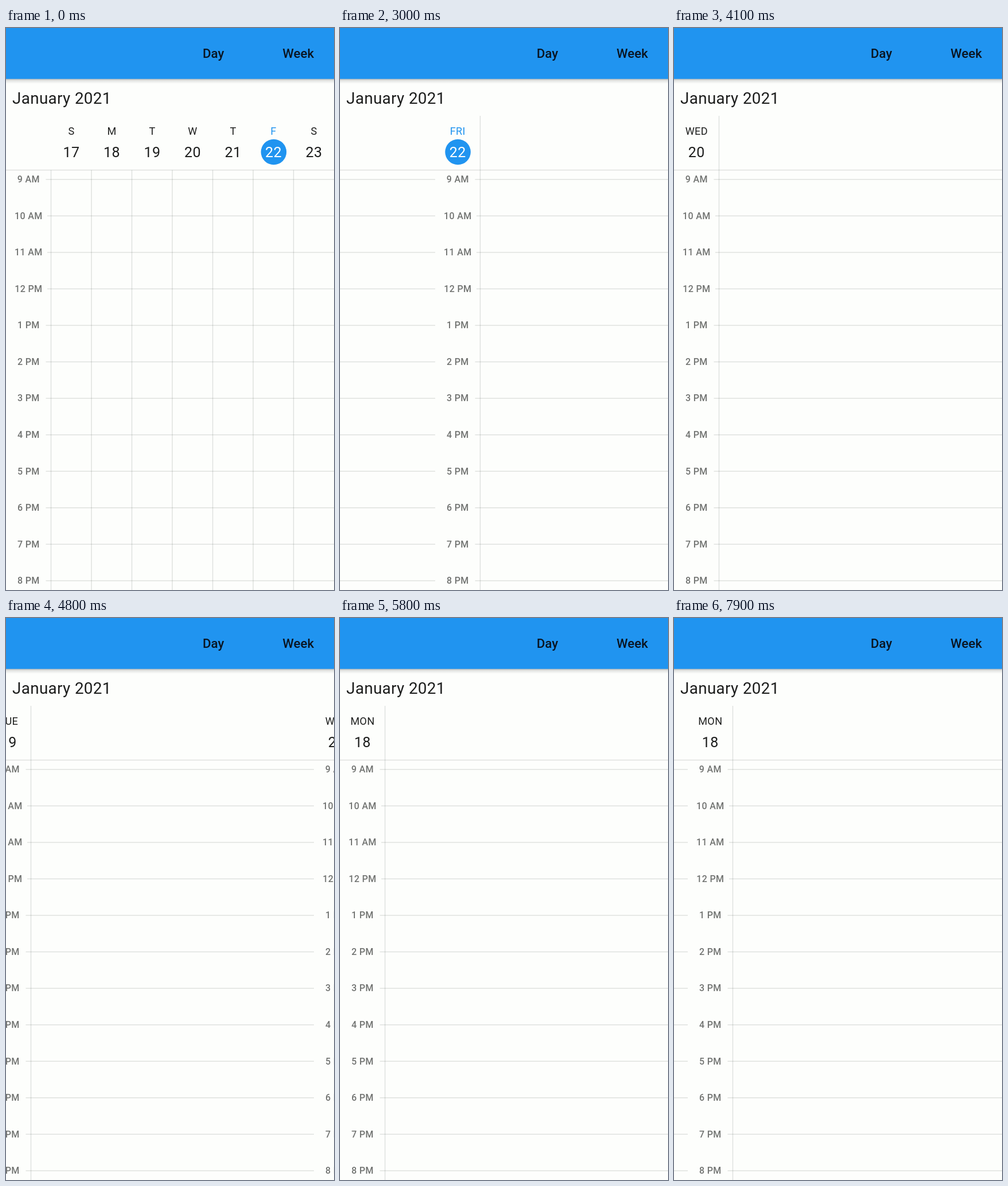
An HTML page with a canvas that plays this animation: 572 by 979 pixels, repeating every 8 s.

```html
<!DOCTYPE html>
<html lang="en">
<head>
<meta charset="utf-8">
<title>Calendar day and week views</title>
<style>
  html, body { margin: 0; width: 100%; height: 100%; overflow: hidden; background: #fdfefc; }
  canvas { display: block; }
</style>
</head>
<body>
<canvas id="stage" width="572" height="979"></canvas>
<script>
const W = 572, H = 979, LOOP = 8000, TICK = 100;
const BLUE = '#2094f0', PAPER = '#fdfefc', INK = '#1d1e1d', GREY = '#717371';
const LINE = 'rgba(0,20,10,0.125)';
const GUTTER = 78.5, HEAD_TOP = 153, HEAD_END = 247.5;
const ROW0 = 263.8, ROW_H = 63.55;
const TODAY = 22, NAMES = ['SUN', 'MON', 'TUE', 'WED', 'THU', 'FRI', 'SAT'];
const FADE_START = 12, FADE_STEPS = 5;

// Page swipes: first tick, day left, direction, distance travelled per tick
const SWIPES = [
  [30, 22, -1, [166, 540, 569, W]],
  [38, 21, -1, [133, 538, 569, W]],
  [46, 20, -1, [34, 160, 537, 569, W]],
  [55, 19, -1, [150, 540, 569, W]],
  [63, 18, -1, [320, 556, W]],
  [78, 17, 1, [138, 548]]
];

const ctx = document.getElementById('stage').getContext('2d');

function text(str, x, y, size, color, weight = 400, align = 'center', gap = 0.35) {
  ctx.font = `${weight} ${size}px Roboto, sans-serif`;
  ctx.letterSpacing = gap + 'px';
  ctx.textAlign = align;
  ctx.fillStyle = color;
  ctx.fillText(str, x, y);
}

function hLine(x0, x1, y) {
  ctx.fillStyle = LINE;
  ctx.fillRect(x0, y - 0.7, x1 - x0, 1.4);
}

function vLine(x, top) {
  ctx.fillStyle = LINE;
  ctx.fillRect(x - 0.7, top, 1.4, H - top);
}

function dayLabel(name, day, x) {
  const today = day === TODAY;
  if (today) {
    ctx.fillStyle = BLUE;
    ctx.beginPath();
    ctx.arc(x + 0.3, 216, 22.3, 0, Math.PI * 2);
    ctx.fill();
  }
  text(name, x, 186.3, 18.1, today ? BLUE : INK);
  text(day, x, 224.8, 25.06, today ? '#fff' : INK);
}

function hours(x) {
  for (let i = 0; i < 12; i++) {
    const y = ROW0 + i * ROW_H;
    const hour = (i + 8) % 12 + 1;
    text(`${hour} ${i < 3 ? 'AM' : 'PM'}`, x + 39.3, y + 5.3, 16, GREY, 500);
    hLine(x + (hour > 9 ? 72 : 69.5), x + W, y);
  }
}

function weekView() {
  const colW = (W - GUTTER) / 7;
  hLine(0, W, HEAD_END);
  hours(0);
  NAMES.forEach((name, i) => {
    const x = GUTTER + i * colW;
    vLine(x, HEAD_END);
    dayLabel(name[0], 17 + i, x + colW / 2 + 0.3);
  });
}

function dayView(pos) {
  hLine(0, W, HEAD_END);
  for (let day = Math.floor(pos); day <= Math.ceil(pos); day++) {
    const x = (day - pos) * W;
    hours(x);
    vLine(x + GUTTER, HEAD_TOP);
    dayLabel(NAMES[day - 17], day, x + 39.3);
  }
}

function pagePosition(tick) {
  let pos = TODAY;
  for (const [start, from, dir, path] of SWIPES) {
    if (tick < start) break;
    const i = Math.min(tick - start, path.length - 1);
    pos = from + dir * path[i] / W;
  }
  return pos;
}

function appBar() {
  const shade = ctx.createLinearGradient(0, 88, 0, 97);
  shade.addColorStop(0, 'rgba(0,0,0,0.3)');
  shade.addColorStop(0.4, 'rgba(0,0,0,0.1)');
  shade.addColorStop(1, 'rgba(0,0,0,0)');
  ctx.fillStyle = shade;
  ctx.fillRect(0, 88, W, 9);
  ctx.fillStyle = BLUE;
  ctx.fillRect(0, 0, W, 88.7);
  text('Day', 361.7, 52.4, 22.27, '#0a1420', 500, 'center', 0);
  text('Week', 509.7, 52.4, 22.27, '#0a1420', 500, 'center', 0);
  text('January 2021', 11, 131.5, 27.84, INK, 400, 'left');
}

function draw(time) {
  const tick = Math.floor((time % LOOP) / TICK);
  ctx.globalAlpha = 1;
  ctx.fillStyle = PAPER;
  ctx.fillRect(0, 0, W, H);
  if (tick < FADE_START) {
    weekView();
  } else {
    const p = Math.min((tick - FADE_START) / FADE_STEPS, 1);
    ctx.globalAlpha = 0.1 + 0.9 * p * p;
    dayView(pagePosition(tick));
    ctx.globalAlpha = 1;
  }
  appBar();
}

const begin = performance.now();
function loop() {
  draw(performance.now() - begin);
  requestAnimationFrame(loop);
}
loop();
</script>
</body>
</html>
```
